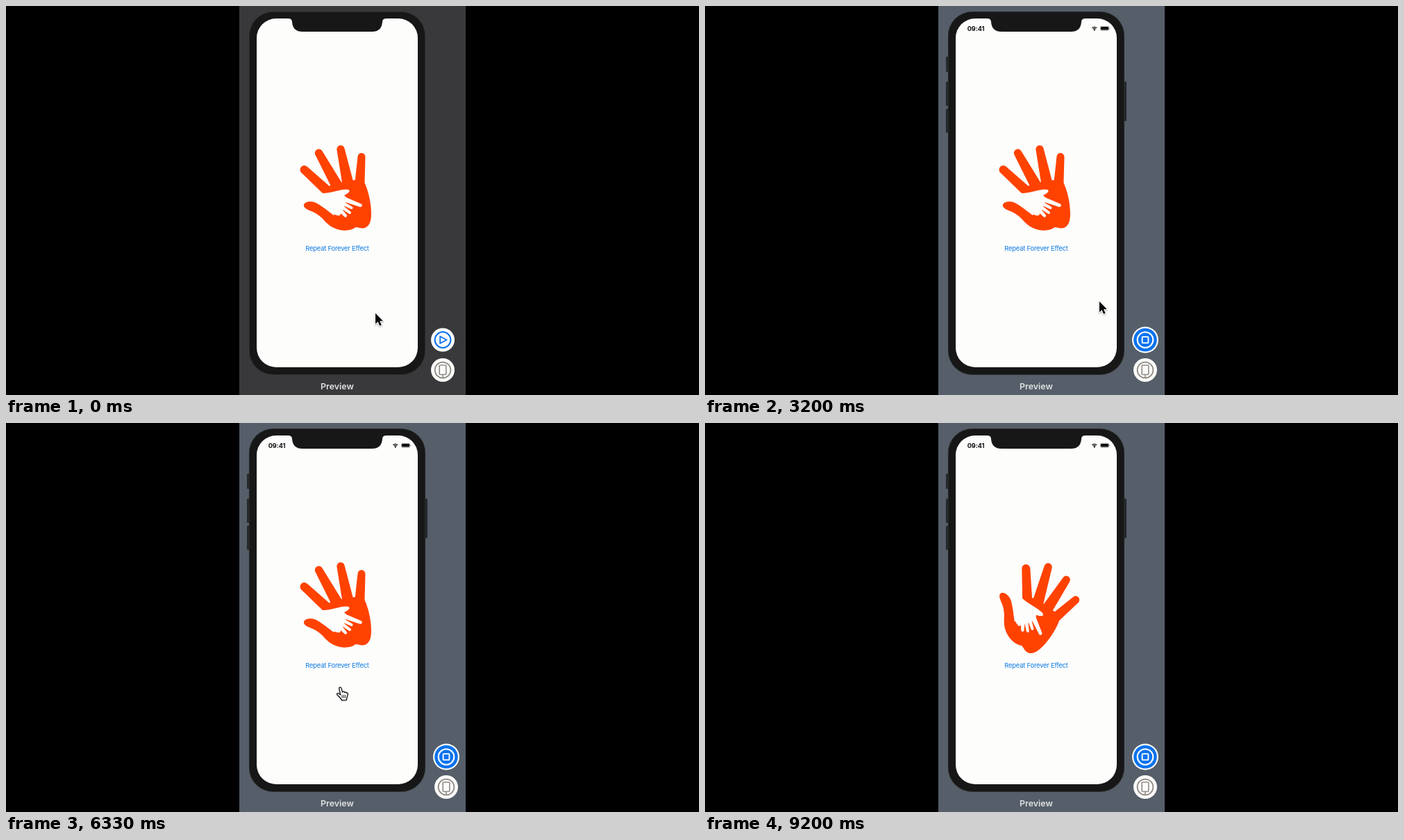
An HTML page with a canvas that plays this animation: 998 by 561 pixels, repeating every 9230 ms.

```html
<!DOCTYPE html>
<html lang="en">
<head>
<meta charset="utf-8">
<title>Repeat Forever Effect</title>
<style>
html, body { margin: 0; width: 100%; height: 100%; overflow: hidden; background: #000; }
canvas { display: block; width: 998px; height: 561px; }
</style>
</head>
<body>
<canvas id="stage" width="998" height="561"></canvas>
<script>
const ctx = document.getElementById('stage').getContext('2d');
const LOOP = 9230;
const LIVE = 1250;      // live preview pressed
const BOOT = 2450;      // running device replaces the still one
const TAP = 4000, RELEASE = 4130;
const CURSOR_OUT = 8800;
const ORANGE = '#ff4200', BLUE = '#0a73ee', SCREEN = '#fdfdfc', GREY = '#918c85';
const FONT = 'Inter, "Open Sans", sans-serif';
const SWING = 45 * Math.PI / 180;
const PIVOT = [477.5, 262.5];

// swings completed (there and back) at given times
const BEATS = [[RELEASE, 0], [4330, .28], [5370, 1.71], [6330, 3], [7630, 4.83], [LOOP - 30, 7.5], [LOOP, 7.55]];
// pointer stops: time, x, y
const STOPS = [[0, 532, 443], [150, 532, 443], [920, 630, 478], [2850, 630, 478],
  [3650, 478, 351], [4400, 478, 351], [4650, 480.5, 381]];

const PALM = new Path2D('M456 269 L462 262 L470 257 L484 254 L502 251 L516 254 ' +
  'C522 267 526 284 526 300 C526 314 521 321 512 320.5 C508 320 506 319 503.5 319 ' +
  'C497 325 482 325 472 320 C461 315 458 307 449 301 C441 295 434 295 430 290.5 ' +
  'C426 285 433 282 438 282 C446 282 450 286 458 291 L472 302 L480 270 Z');
const SMALL_PALM = new Path2D('M455 270 C466 270.5 478 265 490 264.5 C497 264.5 496 269 487 273 ' +
  'L490 276 L489 286 L484 295 L481 302 C475 303 469 299 462 294 L453 287.5 L447 283 Z');
const FINGERS = [[429.5, 236, 6, 461, 265, 7], [450.5, 212, 5.7, 476, 258, 8],
  [482, 206.5, 5.6, 492, 254, 8], [512, 217.5, 5.5, 509.5, 254, 7]];
const SMALL_FINGERS = [[510.5, 287.5, 2.3, 488, 279, 3.6], [497.5, 291, 2, 486, 285, 2.6],
  [495, 298, 2, 484, 290, 2.6], [489, 302.5, 2.1, 481, 294, 3]];
const ARROW = new Path2D('M0 0 L0 15.6 L3.6 12.2 L6.1 18 L8.7 16.9 L6.2 11.2 L11 11.2 Z');
const POINTER = new Path2D('M-.8 1.6 C-.8 -.3 2 -.3 2.5 1.4 L4 7 C5 5.9 6.8 6.2 7.1 7.5 ' +
  'C8.2 6.6 9.6 7.2 9.8 8.3 C11.3 7.7 12 8.7 11.7 10.4 L10.3 15.8 L9.7 18.6 L3.1 18.8 ' +
  'C2.2 16.2 -.6 13.8 -3.3 11.2 C-5 9.3 -3 7.9 -1.4 9.2 L1.2 11 Z');

const clamp = v => Math.max(0, Math.min(1, v));
const smooth = v => v * v * (3 - 2 * v);

function track(list, t, col, ease = v => v) {
  let i = 0;
  while (i < list.length - 2 && t > list[i + 1][0]) i++;
  const a = list[i], b = list[i + 1];
  return a[col] + (b[col] - a[col]) * ease(clamp((t - a[0]) / (b[0] - a[0])));
}

// cubic-bezier(.42, 0, .58, 1)
function easeInOut(x) {
  let lo = 0, hi = 1, s = .5;
  for (let i = 0; i < 16; i++) {
    s = (lo + hi) / 2;
    const r = 1 - s;
    if (1.26 * r * r * s + 1.74 * r * s * s + s * s * s < x) lo = s; else hi = s;
  }
  return smooth(s);
}

function handAngle(t) {
  if (t < RELEASE) return 0;
  const p = track(BEATS, t, 1) % 1;
  return SWING * easeInOut(p < .5 ? p * 2 : 2 - p * 2);
}

function box(x, y, w, h, r, color) {
  ctx.fillStyle = color;
  ctx.beginPath();
  ctx.roundRect(x, y, w, h, r);
  ctx.fill();
}

function disc(x, y, r, color) {
  ctx.fillStyle = color;
  ctx.beginPath();
  ctx.arc(x, y, r, 0, 7);
  ctx.fill();
}

function outline(color, width, draw) {
  ctx.strokeStyle = color;
  ctx.lineWidth = width;
  ctx.beginPath();
  draw();
  ctx.stroke();
}

function label(str, x, y, font, color, spacing = 0) {
  ctx.font = font + ' ' + FONT;
  ctx.letterSpacing = spacing + 'px';
  ctx.textAlign = 'center';
  ctx.fillStyle = color;
  ctx.fillText(str, x, y);
}

function finger([x0, y0, r0, x1, y1, r1]) {
  const a = Math.atan2(y1 - y0, x1 - x0), q = Math.PI / 2;
  ctx.beginPath();
  ctx.arc(x0, y0, r0, a + q, a + 3 * q);
  ctx.arc(x1, y1, r1, a - q, a + q);
  ctx.fill();
}

function drawHand(angle) {
  const [px, py] = PIVOT;
  ctx.save();
  ctx.translate(px, py);
  ctx.rotate(angle);
  ctx.translate(-px, -py);
  ctx.fillStyle = ORANGE;
  FINGERS.forEach(finger);
  ctx.fill(PALM);
  ctx.fillStyle = SCREEN;
  ctx.fill(SMALL_PALM);
  SMALL_FINGERS.forEach(finger);
  ctx.restore();
}

function drawStatus() {
  label('09:41', 390, 36, '700 9.2px', '#111', -.1);
  for (const r of [2.6, 4.8]) {
    outline('#111', 1.4, () => ctx.arc(560.8, 35.2, r, Math.PI * 1.25, Math.PI * 1.75));
  }
  disc(560.8, 34.7, 1, '#111');
  outline('#777', .6, () => ctx.roundRect(569.3, 29.3, 12.4, 6, 1.8));
  box(570, 30, 11, 4.6, 1, '#111');
  box(582.3, 31.2, .9, 2.2, .4, '#777');
}

function drawDevice(running) {
  if (running) {
    const side = '#25282b';
    box(347, 73, 6, 22, 1.5, side);
    box(347, 109, 6, 35, 1.5, side);
    box(347, 148, 6, 35, 1.5, side);
    box(601, 109, 6, 57, 1.5, side);
  }
  box(350, 8, 254, 524, 35, '#161716');
  outline('#3c3f41', .6, () => ctx.roundRect(350.3, 8.3, 253.4, 523.4, 34.7));
  box(361, 18, 232, 503, 28, SCREEN);
  ctx.fillStyle = '#161716';
  ctx.fill(new Path2D('M406 17 L548 17 L548 18 Q542 18 542 23 Q541 37 527 37 ' +
    'L427 37 Q413 37 412 23 Q412 18 406 18 Z'));
  if (running) drawStatus();
}

function drawControls(x, live) {
  if (live) {
    disc(x, 481.5, 19, '#fafafa');
    disc(x, 481.5, 16.8, BLUE);
    outline('#fff', 2.1, () => ctx.arc(x, 481.5, 11.3, 0, 7));
    outline('#fff', 1.9, () => ctx.roundRect(x - 4.4, 477.1, 8.8, 8.8, 1));
  } else {
    disc(x, 481.5, 17, '#fbfbfb');
    outline(BLUE, 2, () => ctx.arc(x, 481.5, 11.4, 0, 7));
    ctx.lineJoin = 'round';
    outline(BLUE, 1.8, () => {
      ctx.moveTo(x - 3.8, 476.5);
      ctx.lineTo(x + 5.6, 481.5);
      ctx.lineTo(x - 3.8, 486.5);
      ctx.closePath();
    });
    ctx.lineJoin = 'miter';
  }
  disc(x, 525, 17, '#fbfbfa');
  outline(GREY, 1.8, () => ctx.arc(x, 525, 11.4, 0, 7));
  outline(GREY, 1.6, () => {
    ctx.roundRect(x - 4.8, 518, 9.6, 13.5, 1);
    ctx.moveTo(x, 531.5);
    ctx.lineTo(x, 536);
  });
}

function drawCursor(t) {
  if (t >= CURSOR_OUT) return;
  const x = track(STOPS, t, 1, smooth), y = track(STOPS, t, 2, smooth);
  const overLink = t > 3000 && x < 526 && y > 338;
  const shape = overLink ? POINTER : ARROW;
  ctx.save();
  ctx.translate(x, y);
  ctx.lineJoin = 'round';
  ctx.shadowColor = 'rgba(0,0,0,.35)';
  ctx.shadowBlur = 2;
  ctx.shadowOffsetY = 1;
  if (overLink) {
    ctx.fillStyle = '#fff';
    ctx.fill(shape);
    ctx.shadowColor = 'transparent';
    ctx.strokeStyle = '#111';
    ctx.lineWidth = 1.3;
    ctx.stroke(shape);
    for (const dx of [3.5, 5.8, 8.1]) {
      outline('#111', 1, () => { ctx.moveTo(dx, 11.2); ctx.lineTo(dx, 15.5); });
    }
  } else {
    ctx.strokeStyle = '#fff';
    ctx.lineWidth = 2.2;
    ctx.stroke(shape);
    ctx.shadowColor = 'transparent';
    ctx.fillStyle = '#050505';
    ctx.fill(shape);
  }
  ctx.restore();
}

function linkAlpha(t) {
  if (t < TAP) return 1;
  if (t < RELEASE) return .3;
  return .3 + .7 * clamp((t - RELEASE) / 250);
}

function draw(t) {
  const live = t >= LIVE, running = t >= BOOT;
  ctx.fillStyle = '#000';
  ctx.fillRect(0, 0, 998, 561);
  ctx.fillStyle = live ? '#555e69' : '#39393b';
  ctx.fillRect(336, 0, 326, 561);
  drawDevice(running);
  drawHand(handAngle(t));
  ctx.globalAlpha = linkAlpha(t);
  label('Repeat Forever Effect', 477, 352.8, '400 9.4px', '#0d7be3', -.2);
  ctx.globalAlpha = 1;
  label('Preview', live && !running ? 480 : 477, 552.5, '600 12.4px', '#e2e3e4');
  drawControls(running ? 634 : 629, live);
  drawCursor(t);
}

const start = performance.now();
function tick() {
  draw((performance.now() - start) % LOOP);
  requestAnimationFrame(tick);
}
tick();
</script>
</body>
</html>
```
